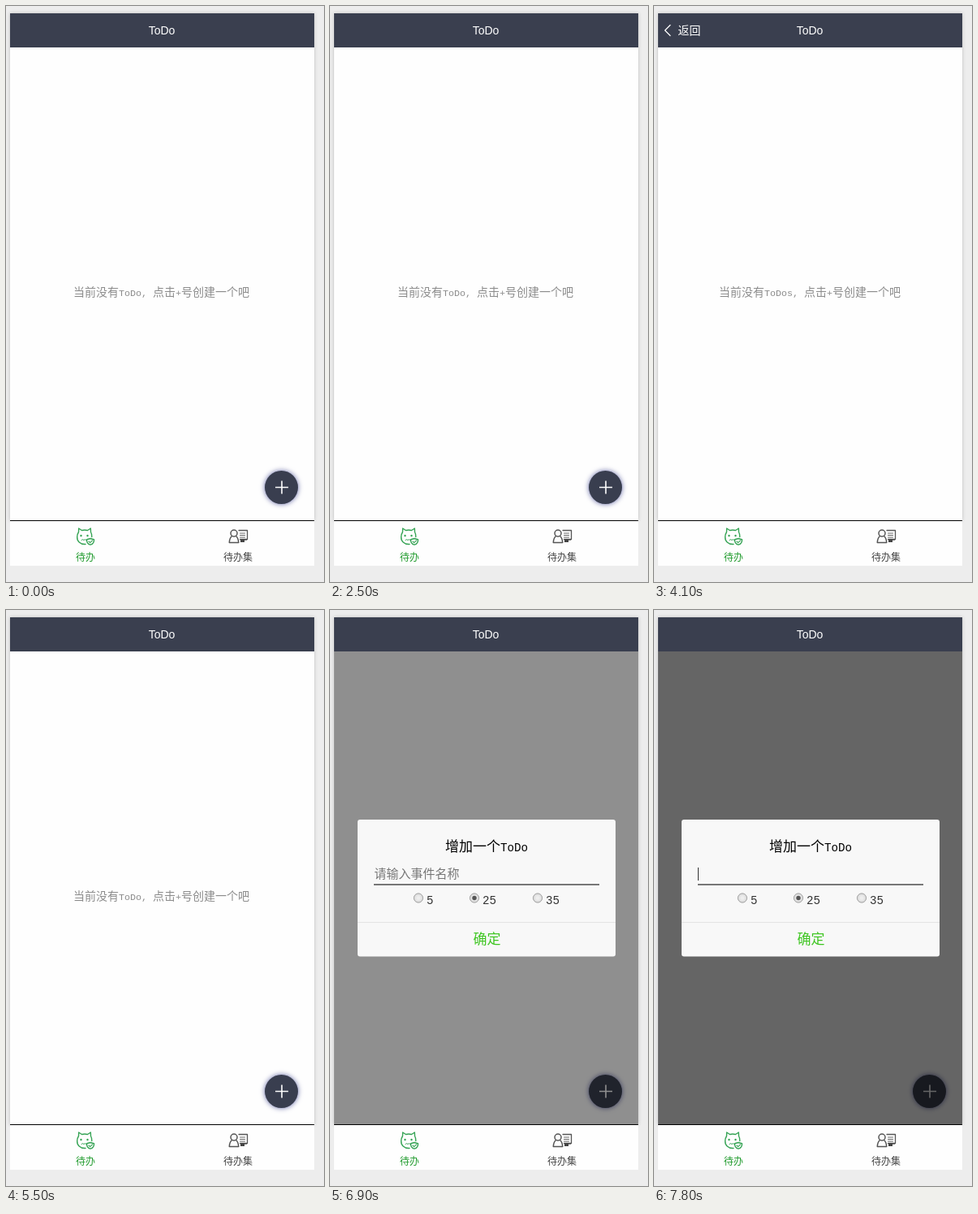
Animation, 392 px wide and 709 px high, one loop 8000 ms. Source, as an HTML page:

```html
<!DOCTYPE html>
<html lang="zh-CN">
<head>
<meta charset="utf-8">
<title>ToDo</title>
<style>
html, body { margin: 0; width: 100%; height: 100%; overflow: hidden; background: #ededed; }
svg { display: block; width: 100%; height: 100%; }
text { font-family: "Noto Sans CJK SC", "Noto Sans CJK", sans-serif; white-space: pre; }
.latin { font-family: "Liberation Mono", monospace; }
.head { font: 14px "Liberation Sans", sans-serif; }
.hint { font-size: 14px; font-weight: 300; fill: #8c8c8c; }
.hint .latin { font-size: 11.67px; }
.tab { font-size: 12px; text-anchor: middle; }
.dialog { font-size: 17px; font-weight: 300; }
.dialog .latin { font-size: 14.17px; }
.line { fill: none; stroke-linecap: round; stroke-linejoin: round; }
.glow { filter: drop-shadow(0 0 3px #6468a5); }
.paper { filter: drop-shadow(0 0 2px #0003); }

/* Each percentage is the time in ms divided by 80. */
.bar, .back, .todo, .set, .mask, .dialog, .first, .second, .placeholder, .caret {
  animation: 8s steps(1) infinite;
}
.bar { animation-name: bar; }
.back { animation-name: back; }
.todo { animation-name: todo; }
.set { animation-name: set; }
.mask { animation-name: mask; }
.dialog { animation-name: dialog; }
.first { animation-name: first; }
.second { animation-name: second; }
.placeholder { animation-name: placeholder; }
.caret { animation-name: caret; }

@keyframes bar {
  0% { opacity: 1; }
  12.5% { opacity: 0; animation-timing-function: steps(5); }
  18.75% { opacity: 1; }
  42.5% { opacity: 0; animation-timing-function: steps(7); }
  51.25%, 100% { opacity: 1; }
}
@keyframes back {
  0% { opacity: 0; }
  42.5% { opacity: 0; animation-timing-function: steps(7); }
  51.25% { opacity: 1; }
  63.75%, 100% { opacity: 0; }
}
@keyframes todo {
  0% { opacity: 1; }
  12.5% { opacity: 0; }
  31.25% { opacity: 1; }
  42.5% { opacity: 0; }
  63.75% { opacity: .1; animation-timing-function: steps(4); }
  68.75%, 100% { opacity: 1; }
}
@keyframes set {
  0% { opacity: 0; transform: none; }
  12.5% { opacity: 0; transform: none; animation-timing-function: steps(5); }
  18.75% { opacity: 1; transform: none; }
  31.25% { opacity: 0; transform: none; }
  42.5% { opacity: .1; transform: translateX(375px); }
  43.75% { opacity: .25; transform: translateX(310px); }
  45% { opacity: .45; transform: translateX(220px); }
  46.25% { opacity: .65; transform: translateX(120px); }
  47.5% { opacity: .8; transform: translateX(55px); }
  48.75% { opacity: .9; transform: translateX(18px); }
  50% { opacity: .95; transform: translateX(4px); }
  51.25% { opacity: 1; transform: none; }
  63.75% { opacity: .9; transform: translateX(12px); }
  65% { opacity: .7; transform: translateX(65px); }
  66.25% { opacity: .45; transform: translateX(150px); }
  67.5% { opacity: .2; transform: translateX(242px); }
  68.75%, 100% { opacity: 0; transform: none; }
}
@keyframes mask {
  0% { opacity: 0; }
  85% { opacity: .2; }
  86.25% { opacity: .44; }
  87.5% { opacity: .56; }
  88.75%, 100% { opacity: .6; }
}
@keyframes dialog {
  0% { opacity: 0; }
  85% { opacity: .4; }
  86.25%, 100% { opacity: 1; }
}
@keyframes first {
  0% { fill: #1f9a2c; }
  12.5% { fill: #444; }
  31.25%, 100% { fill: #1f9a2c; }
}
@keyframes second {
  0% { fill: #444; }
  12.5% { fill: #1f9a2c; }
  31.25%, 100% { fill: #444; }
}
@keyframes placeholder { 0% { opacity: 1; } 97.5%, 100% { opacity: 0; } }
@keyframes caret { 0% { opacity: 0; } 97.5%, 100% { opacity: 1; } }
</style>
</head>
<body>
<svg viewBox="0 0 392 709" preserveAspectRatio="none">
  <defs>
    <radialGradient id="knob">
      <stop offset=".3" stop-color="#eee"/>
      <stop offset="1" stop-color="#d8d8d8"/>
    </radialGradient>
    <circle id="radio" r="5.6" fill="url(#knob)" stroke="#a0a0a0"/>
  </defs>

  <rect width="392" height="709" fill="#ededed"/>
  <rect class="paper" x="5" y="9" width="375" height="624" fill="#fefefe"/>

  <rect x="5" y="9" width="375" height="42"/>
  <g class="bar">
    <rect x="5" y="9" width="375" height="42" fill="#3a3f4f"/>
    <text class="head" x="192" y="35" fill="#fff" text-anchor="middle">ToDo</text>
  </g>
  <g class="back">
    <path class="line" d="M20 23.5L13.5 30L20 36.5" stroke="#fff" stroke-width="1.2"/>
    <text x="29.5" y="35" font-size="14" fill="#fff">返回</text>
  </g>

  <text class="hint set" x="80" y="357">当前没有<tspan class="latin">ToDos, </tspan>点击<tspan class="latin">+</tspan>号创建一个吧</text>
  <g class="todo">
    <text class="hint" x="83" y="357">当前没有<tspan class="latin">ToDo, </tspan>点击<tspan class="latin">+</tspan>号创建一个吧</text>
    <circle class="glow" cx="339.5" cy="592.5" r="20.5" fill="#393e4f"/>
    <path d="M332 592.5h16M340 584.5v16" stroke="#fff" stroke-width="1.6"/>
  </g>

  <rect x="5" y="633" width="375" height="56" fill="#fefefe"/>
  <rect x="5" y="633" width="375" height="1"/>

  <g class="line" stroke="#35a354" stroke-width="1.4">
    <path d="M98 662.5C91 663 87.500 658.500 87.700 653.500C87.800 651 88.500 649 89.500 647.500L89.700 643L93.500 645.500Q97 644.500 100.500 645.500L104.300 643L104.500 647.500Q106 650 105.800 653.500"/>
    <path d="M93 657.500q1.500-2 3 0q1.500-2 3 0" stroke-width="1"/>
    <path d="M104 655.500l4.500 1.200q.3 5-4.500 6.500q-4.800-1.500-4.500-6.500z"/>
    <path d="M102 659l1.700 1.600l2.800-2.800" stroke-width="1.100"/>
  </g>
  <circle cx="92.500" cy="652" r="1.200" fill="#35a354"/>
  <circle cx="100.500" cy="652" r="1.200" fill="#35a354"/>

  <g class="line" stroke="#555" stroke-width="1.500">
    <circle cx="281" cy="649" r="4"/>
    <path d="M278.500 652.500Q275.500 655 275.300 660.500H286.700Q286.500 655 283.500 652.500"/>
    <path d="M287 645.500H297.500V656.500H288.500" stroke-width="1.300"/>
    <path d="M288.500 649h6M288.500 651.500h6M288.500 654h6" stroke-width=".9"/>
  </g>
  <path d="M289 656h8v1.500h-3v2.500h-5z" fill="#444"/>

  <text class="tab first" x="98" y="683">待办</text>
  <text class="tab second" x="286" y="683">待办集</text>

  <rect class="mask" x="5" y="51" width="375" height="582"/>
  <g class="dialog">
    <rect x="34" y="258" width="318" height="168.500" rx="3" fill="#f8f8f8"/>
    <text x="142" y="297">增加一个<tspan class="latin">ToDo</tspan></text>
    <text class="placeholder" x="54.500" y="330" font-size="15" fill="#777">请输入事件名称</text>
    <rect class="caret" x="54" y="317" width="1" height="16" fill="#333"/>
    <rect x="54" y="337" width="278" height="2" fill="#777"/>
    <use href="#radio" x="109" y="354.500"/>
    <use href="#radio" x="178" y="354.500"/>
    <use href="#radio" x="256" y="354.500"/>
    <circle cx="178" cy="354.500" r="2.700" fill="#555"/>
    <g fill="#333">
      <text class="latin" x="119" y="361.500">5</text>
      <text class="latin" x="188" y="361.500">25</text>
      <text class="latin" x="266" y="361.500">35</text>
    </g>
    <rect x="34" y="384" width="318" height="1" fill="#e4e4e4"/>
    <text x="176.500" y="411" fill="#3cc51f" font-weight="400">确定</text>
  </g>
</svg>
</body>
</html>
```
